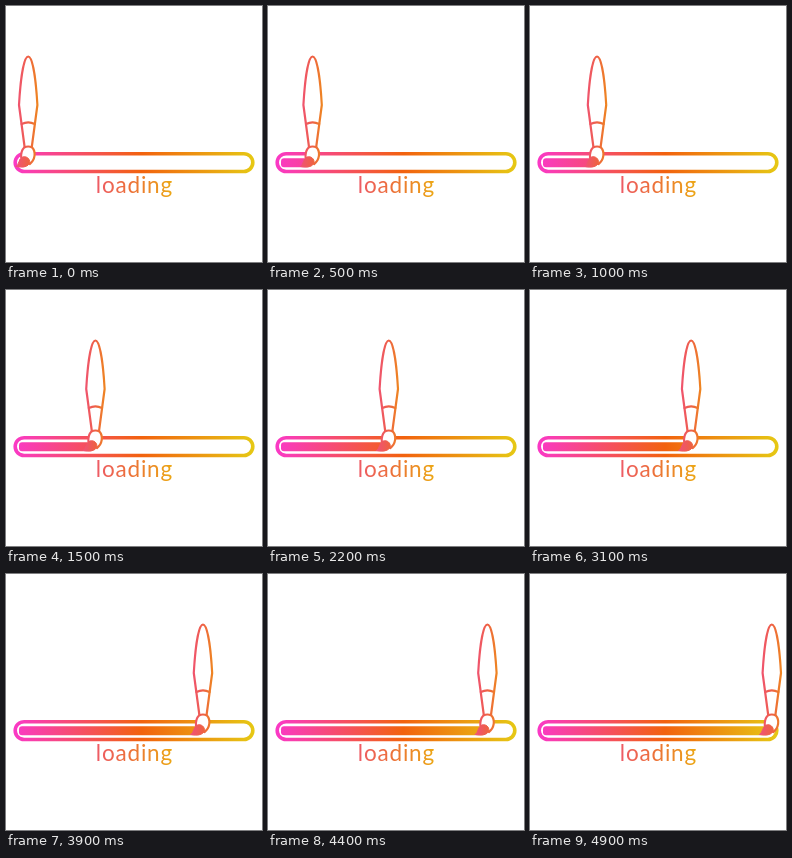
An HTML page for the animation above (5 s loop, 256 by 256 pixels).

```html
<!DOCTYPE html>
<html>
<head>
<meta charset="utf-8">
<style>
  html, body { margin: 0; width: 100%; height: 100%; overflow: hidden; background: #fff; }
  svg { display: block; width: 100vw; height: 100vh; }
  text { font: 400 22.5px Lato, "Open Sans", sans-serif; letter-spacing: .8px; }
</style>
</head>
<body>
<svg viewBox="0 0 256 256">
  <defs>
    <linearGradient id="bar" gradientUnits="userSpaceOnUse" x1="8" x2="248" y1="0" y2="0">
      <stop offset="0" stop-color="#fa39c6"/>
      <stop offset=".53" stop-color="#f2620e"/>
      <stop offset="1" stop-color="#e6c814"/>
    </linearGradient>
    <linearGradient id="word" gradientUnits="userSpaceOnUse" x1="89" x2="167" y1="0" y2="0">
      <stop offset="0" stop-color="#ee5a68"/>
      <stop offset=".5" stop-color="#ec7434"/>
      <stop offset="1" stop-color="#eca814"/>
    </linearGradient>
    <linearGradient id="ink" gradientUnits="userSpaceOnUse" x1="-13" x2="11" y1="0" y2="0">
      <stop offset="0" stop-color="#f0507c"/>
      <stop offset=".55" stop-color="#ee6144"/>
      <stop offset="1" stop-color="#ee8a1c"/>
    </linearGradient>
  </defs>

  <rect x="9.2" y="147.7" width="237.6" height="17.8" rx="8.9" fill="none" stroke="url(#bar)" stroke-width="3.6"/>
  <rect id="fill" x="13" y="152.3" width="8" height="9" rx="3" fill="url(#bar)"/>
  <text x="128.4" y="187" text-anchor="middle" fill="url(#word)">loading</text>

  <!-- brush, centred on x = 0 -->
  <g id="brush" fill="#fff" stroke="url(#ink)" stroke-width="2.2" stroke-linejoin="round" stroke-linecap="round">
    <path d="M0 50.5C-5 50.5-8 78-9.2 99L-3.6 141H3.6L9.2 99C8 78 5 50.5 0 50.5Z"/>
    <path d="M-6.6 118Q0 114.600 6.6 118" fill="none"/>
    <path d="M-4 141.500Q0 139.500 4 141.500C8 146 7 154 1.500 158L-7 151.500Q-7.500 145-4 141.500Z"/>
    <path d="M-12 160.500C-9 158.500-9.500 152.500-5.500 151C-1.500 149.800 1.800 153 1.500 156.500C.5 161-6 161.800-12 160.500Z" fill="url(#ink)" stroke-width="1"/>
  </g>
</svg>
<script>
  const brush = document.getElementById('brush');
  const fill = document.getElementById('fill');
  const STEPS = 50, STEP_MS = 100;

  function draw(now) {
    const step = Math.floor(now / STEP_MS) % STEPS;
    const x = 22.2 + step * 219.6 / (STEPS - 1);
    brush.setAttribute('transform', `translate(${x} 0)`);
    fill.setAttribute('width', x - 15);
    requestAnimationFrame(draw);
  }
  draw(performance.now());
</script>
</body>
</html>
```
